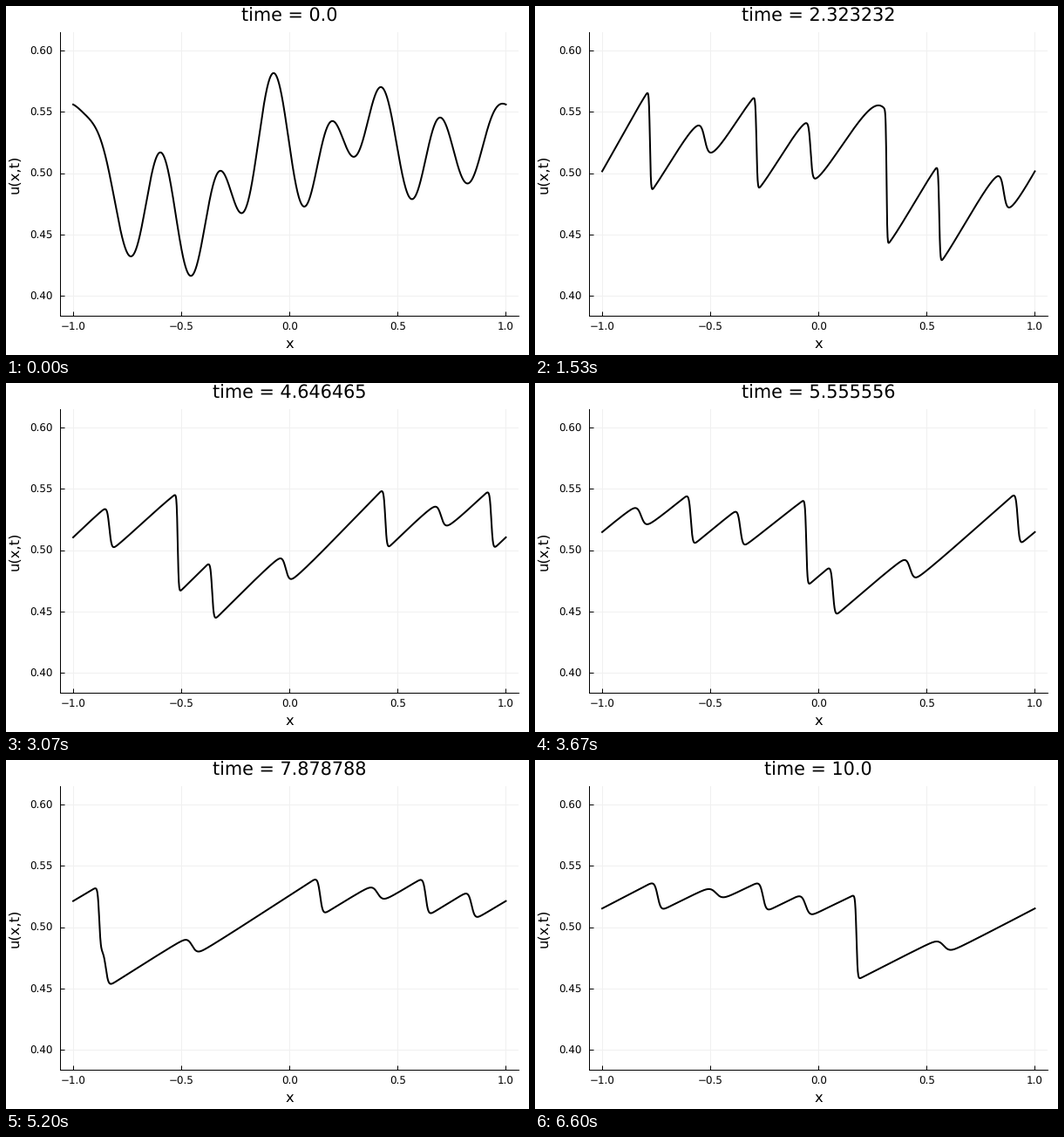
Write a matplotlib script that moves like this. It is 600 px wide and 400 px high and loops after 6670 ms.

```python
import numpy as np
import matplotlib.pyplot as plt
from matplotlib.animation import FuncAnimation

W, H, DPI = 600, 400, 100
LOOP_MS, TICKS_PER_STEP = 6670, 3
STEPS, T_END = 100, 10.0
NU, N, SUBSTEPS = 1e-4, 2048, 18
MEAN = 0.508

# pixel geometry of the axes
X0, XS = 325.25, 248.2
Y0, YS = 51.2, 1405.0
LEFT, RIGHT, TOP, BOTTOM = 62, 588, 30, 355


def to_x(px):
    return (np.asarray(px) - X0) / XS


def to_u(py):
    return 0.6 - (np.asarray(py) - Y0) / YS


# turning points of the initial wave, and a few points on its left shoulder
TURNS = np.array([
    (143, 287), (177.5, 168), (212, 309.5), (246, 189), (270.5, 237.5),
    (307, 77), (342, 230), (375, 132), (399, 173), (430, 93),
    (465.5, 221.5), (498, 128), (530, 203.5), (570.5, 112)])
SHOULDER = np.array([(77.3, 113), (89, 123), (101, 137), (113, 167.5), (127, 236)])


def initial_wave(x, modes=10):
    """Periodic Fourier fit through the turning points."""
    k = np.pi * np.arange(1, modes + 1)

    def basis(p):
        a = np.outer(p, k)
        return np.hstack([np.cos(a), np.sin(a)])

    def slope(p):
        a = np.outer(p, k)
        return np.hstack([-k * np.sin(a), k * np.cos(a)])

    xt, ut = to_x(TURNS[:, 0]), to_u(TURNS[:, 1]) - MEAN
    xs, us = to_x(SHOULDER[:, 0]), to_u(SHOULDER[:, 1]) - MEAN
    ridge = np.tile(np.where(np.arange(1, modes + 1) > 8, 0.12, 0.015), 2)
    A = np.vstack([basis(xt), 0.01 * slope(xt), 0.6 * basis(xs), np.diag(ridge)])
    b = np.concatenate([ut, np.zeros(len(xt)), 0.6 * us, np.zeros(2 * modes)])
    return basis(x) @ np.linalg.lstsq(A, b, rcond=None)[0]


def solve_burgers():
    """Viscous Burgers, pseudo-spectral, in the frame moving with the mean."""
    x = -1 + 2 * np.arange(N) / N
    k = np.pi * np.arange(N // 2 + 1)
    h = T_END / (STEPS - 1) / SUBSTEPS
    E = np.exp(-NU * k**2 * h / 2)
    E2 = E * E
    flux = -0.5j * h * k * (np.arange(N // 2 + 1) < N // 3)

    def rhs(q):
        return flux * np.fft.rfft(np.fft.irfft(q, N) ** 2)

    q = np.fft.rfft(initial_wave(x))
    waves = []
    for i in range(STEPS):
        t = T_END * i / (STEPS - 1)
        u = MEAN + np.fft.irfft(q * np.exp(-1j * k * MEAN * t), N)
        waves.append(np.append(u, u[0]))
        for _ in range(SUBSTEPS):
            a = rhs(q)
            b = rhs(E * (q + a / 2))
            c = rhs(E * q + b / 2)
            d = rhs(E2 * q + E * c)
            q = E2 * q + (E2 * a + 2 * E * (b + c) + d) / 6
    return np.append(x, 1.0), waves


def time_label(i):
    t = T_END * i / (STEPS - 1)
    s = f"{t:.{7 if t < 2 else 6}f}".rstrip("0")
    return "time = " + (s + "0" if s.endswith(".") else s)


plt.rcParams["font.family"] = "DejaVu Sans"
plt.rcParams["text.hinting"] = "none"
fig = plt.figure(figsize=(W / DPI, H / DPI), dpi=DPI, facecolor="white")
PX = 72 / DPI


def text(x, y, s, size, **kw):
    kw = {"ha": "center", "va": "baseline", **kw}
    return fig.text(x / W, 1 - y / H, s, fontsize=size * PX, color="black", **kw)


ax = fig.add_axes([LEFT / W, 1 - BOTTOM / H, (RIGHT - LEFT) / W, (BOTTOM - TOP) / H])
ax.set_xlim(to_x(LEFT), to_x(RIGHT))
ax.set_ylim(to_u(BOTTOM), to_u(TOP))
ax.spines[["top", "right"]].set_visible(False)
ax.spines[["left", "bottom"]].set_linewidth(PX)
xticks = [-1, -0.5, 0, 0.5, 1]
yticks = [0.4, 0.45, 0.5, 0.55, 0.6]
ax.set_xticks(xticks)
ax.set_yticks(yticks)
ax.tick_params(direction="in", length=5 * PX, width=PX,
               labelbottom=False, labelleft=False)
ax.grid(color="0.94", linewidth=PX)
ax.set_axisbelow(True)

for v in xticks:
    text(X0 + XS * v, 372, f"{v:.1f}".replace("-", "\u2212"), 11.9)
for v in yticks:
    text(53.5, Y0 + YS * (0.6 - v) + 4.5, f"{v:.2f}", 11.9, ha="right")
text(X0, 391.5, "x", 16.35)
text(9.8, 193, "u(x,t)", 16.35, rotation=90, va="center")
title = text(X0, 18, time_label(0), 20.8)

xs, waves = solve_burgers()
line, = ax.plot(xs, waves[0], color="black", linewidth=2 * PX, zorder=3)


def update(n):
    # each solution step is held for a few ticks
    i = min((n + 1) // TICKS_PER_STEP, STEPS - 1)
    line.set_ydata(waves[i])
    title.set_text(time_label(i))
    return line, title


ticks = STEPS * TICKS_PER_STEP
anim = FuncAnimation(fig, update, frames=ticks, interval=LOOP_MS / ticks,
                     repeat=True, repeat_delay=0, blit=False)
plt.show()
```
